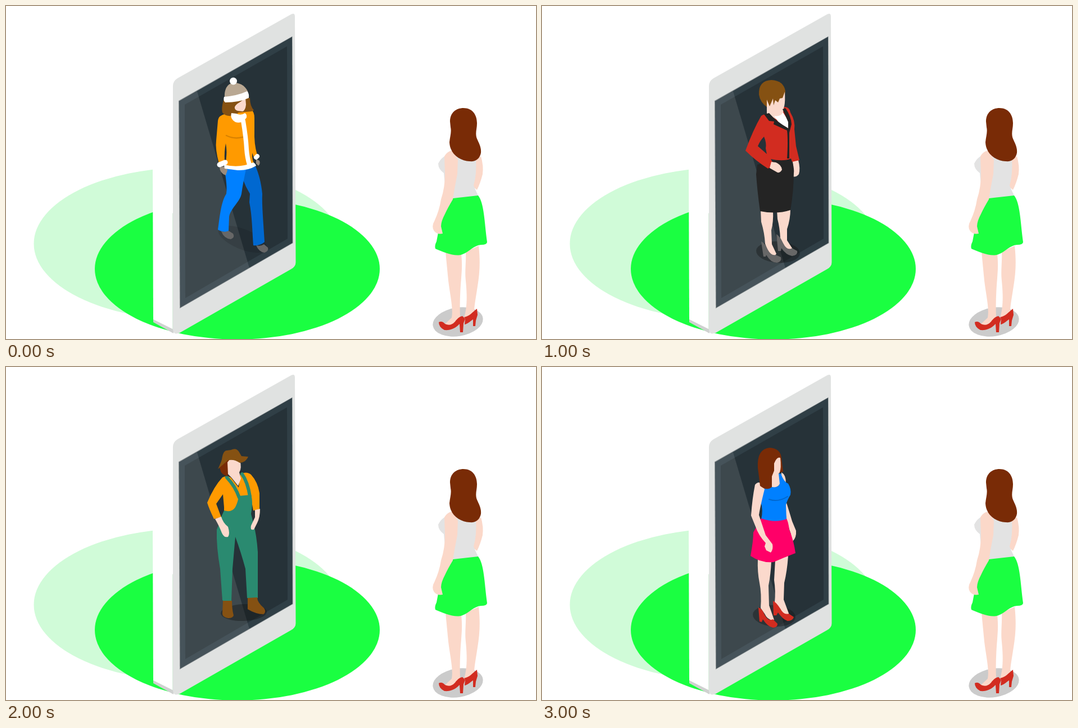
Write an HTML page that moves like this. It is 943 by 594 pixels and loops after 3500 ms.

```html
<!DOCTYPE html>
<html lang="en">
<head>
<meta charset="utf-8">
<title>Virtual fitting room</title>
<style>
html, body { margin: 0; width: 100%; height: 100%; overflow: hidden; background: #fff; }
svg { display: block; width: 943px; height: 594px; }
</style>
</head>
<body>
<svg id="stage" viewBox="0 0 943 594"></svg>
<script>
const C = {
  green: '#1aff41', pale: '#d0fbd8', skin: '#fbd8c9', face: '#fbd9cc',
  auburn: '#792b06', brown: '#855112', red: '#d22c20', orange: '#ff9a00',
  blue: '#0080ff', navy: '#0068d0', pink: '#ff0068', tan: '#b9a893',
  grey: '#676767', black: '#242424', jeans: '#3468d2', jeansDark: '#2a55a8',
  teal: '#2a8a70', white: '#fff', fur: '#e8e8e5', screen: '#263238'
};
const col = c => C[c] || c;
const fill = (c, d) => `<path fill="${col(c)}" d="${d}"/>`;
const line = (c, w, d) =>
  `<path fill="none" stroke="${col(c)}" stroke-width="${w}" stroke-linecap="round" d="${d}"/>`;
const oval = (c, x, y, rx, ry, turn = 0) =>
  `<ellipse fill="${col(c)}" cx="${x}" cy="${y}" rx="${rx}" ry="${ry}" transform="rotate(${turn} ${x} ${y})"/>`;
const shadow = (x, y, rx, ry, turn = 0, alpha = .4) =>
  oval(`rgba(20,20,20,${alpha})`, x, y, rx, ry, turn);

const scene = [
  oval('pale', 322.5, 424, 273, 135.5),
  oval('green', 411.5, 469, 253.5, 125.7),
  // tablet
  fill('white', 'M260.500 155L300 132V583L262 563Z'),
  line('#d9efdc', 1, 'M296.5 370V578'),
  fill('#cfd1d0', 'M262 559L298 577V584L262 564Z'),
  fill('#e0e2e1', 'M297 143Q297 134 305 129L507 15Q514 11 514 19L515.500 457Q515.500 465 507 469.500L309 583Q297 588 297 576Z'),
  fill('#8d9395', 'M307 169L509.500 54L510.500 423L309 539.500Z'),
  fill('#303f46', 'M308 169.700L509 55L509.700 422.500L310 538Z'),
  fill('screen', 'M318 176L500 72L501 415L319 521Z'),
  fill('rgba(255,255,255,.105)', 'M308 169.700L340 152L433 467L310 538Z')
];

const viewer = [
  oval('#cbcbcb', 804, 563.5, 45, 25.5, -9),
  fill('skin', 'M845 268Q850 285 848 300Q844 316 838 328L828 320L830 275Z'),
  fill('skin', 'M818 438L841 428C844 455 843 475 839 500C836 520 833 535 833 546L824 556L815 556C820 540 821 520 818 490C816 475 819 455 818 438Z'),
  fill('skin', 'M782 438L810 442C812 462 811 470 810 485C808 510 807 530 808 554L796 570Q786 574 778 570L793 556C796 540 790 515 787 490Z'),
  fill('#e3e3e3', 'M782 267Q774 271 769 281Q769 291 779 298L781 320L778 344L841 340Q835 328 832 320Q838 300 836 270Z'),
  fill('green', 'M795 343L840 338C851 352 851 385 856 421Q856 426 845 426C832 427 825 438 812 443C800 448 780 440 764 433Q762 428 766 420L773 383Z'),
  fill('skin', 'M780 268Q787 256 797 259L804 275L803 300Q798 325 795 345Q786 360 781 371Q774 384 774 393L777 406Q766 408 761 400Q757 392 762 384Q771 365 774 345Q781 324 781 300Z'),
  fill('auburn', 'M790 206C790 190 801 182 814 182C829 182 838 193 838 209C838 219 835 225 837 234C840 243 846 250 845 262C843 273 835 278 825 277C808 276 790 265 789 243C790 232 793 225 791 216Z'),
  fill('red', 'M815 555C824 554 830 546 838 540L839 551L836 561L835 571L831 571L831 559C826 562 822 567 816 568L817 558Z'),
  fill('red', 'M770 564Q776 561 781 567Q791 572 799 563C804 556 808 554 812 553L817 558L814 566L813 582L808 582L807 567C800 575 790 579 780 578Q770 573 770 564Z')
];

const outfits = [
  [ // winter jacket
    shadow(421, 416, 46, 18, 22, .14),
    fill('navy', 'M420 292L444 286C450 300 454 315 456 335C455 355 458 385 460 421Q452 428 440 427C438 400 438 375 433 350L434 335Q426 322 421 308Z'),
    fill('blue', 'M388 287Q405 295 427 291C424 305 421 320 419 335C416 350 400 360 397 376L396 402Q388 405 377 399C380 380 382 350 392 335C394 320 390 300 388 287Z'),
    fill('grey', 'M383 402Q390 404 396 401L404 406Q408 413 400 416Q388 415 383 402Z'),
    fill('grey', 'M445 427Q453 429 459 425L466 431Q468 437 460 440Q450 439 445 427Z'),
    fill('#9a8b7c', 'M380 287Q380 298 391 302L394 293L391 286ZM445 273L451 276Q453 282 449 285L445 281Z'),
    fill('orange', 'M382 196Q390 191 404 192L436 185Q442 188 442 200L442 222Q441 245 447 266L441 270L438 262Q437 275 443 283Q420 294 390 287Q393 270 391 255L391 276L379 281Q372 255 374 240L377 205Q378 198 382 196Z'),
    fill('screen', 'M391 245Q394 262 391 275L389 276Q388 260 391 245Z'),
    line('#d98200', 2.5, 'M392 231Q406 238 421 234'),
    fill('brown', 'M387 168Q383 182 385 190Q392 199 408 195L414 190L437 188L441 186Q434 178 434 164Z'),
    fill('face', 'M407 180C411 172 419 172 426 163L427 176Q426 186 421 188L412 187Q406 185 407 180Z'),
    line('white', 8, 'M422 205Q427 235 428 255Q429 270 433 283'),
    fill('white', 'M401 191Q398 201 408 207Q420 211 428 199Q429 193 425 191Q418 196 410 192Z'),
    fill('white', 'M388 283Q415 290 440 279Q444 281 445 285Q430 294 412 293L389 290Z'),
    line('white', 9, 'M380 283L390 279'),
    line('white', 8, 'M445 270L447 268'),
    fill('tan', 'M389 163C388 146 396 137 406 137C419 137 428 145 431 155L410 167Z'),
    fill('white', 'M388 162Q412 160 429 152Q433 156 432 164Q415 172 390 172Q386 169 388 162Z'),
    oval('white', 404.5, 134, 6.5, 6.5)
  ],
  [ // pink tee
    shadow(419, 410, 45, 17, 22, .14),
    fill('face', 'M434 236Q438 255 445 266L449 275Q449 281 444 282L440 270Q436 258 433 245ZM436 202L440 202L438 214Z'),
    fill('navy', 'M422 283L440 274C449 295 452 315 453 335C453 360 455 390 457 416Q448 422 437 419C436 390 434 365 430 345Q430 328 420 307Z'),
    fill('blue', 'M390 281Q410 288 428 281C424 300 420 315 416 335C414 350 400 360 396 375L395 395Q386 399 376 392C378 370 382 350 393 335C392 318 393 300 390 281Z'),
    fill('white', 'M383 395Q391 397 395 394L403 400Q406 406 399 409Q386 408 382 398Z'),
    fill('white', 'M444 419Q451 421 457 417L463 423Q465 430 458 432Q448 430 444 419Z'),
    fill('pink', 'M379 196Q388 191 401 194L434 186Q440 192 440 201L438 212Q440 224 434 238Q436 262 441 276Q420 291 388 282Q392 262 390 245L389 213Q381 214 376 211Q374 202 379 196Z'),
    line('#c80054', 3, 'M392 230Q408 238 436 230'),
    fill('face', 'M377 211L389 213Q390 235 388 250Q385 268 386 282L392 288Q393 296 390 298L380 294Q378 288 379 282Q375 260 376 245Z'),
    fill('brown', 'M384 192Q386 180 388 170Q390 155 397 147Q404 142 412 143Q426 144 428 160Q428 180 438 187L424 190L400 196Q388 197 384 192Z'),
    fill('face', 'M401 194L414 186L423 189Q424 205 413 206Q404 204 401 194Z'),
    fill('face', 'M424 155Q427 166 424 179Q421 188 416 188Q410 188 406 182Q408 174 414 172Q419 165 424 155Z')
  ],
  [ // office suit
    shadow(420, 439, 39, 19, 4),
    fill('face', 'M389 363L411 365Q412 385 408 400L409 425L417 442Q410 452 403 440L397 424Q396 405 390 385ZM418 364L442 362Q442 380 436 398L436 418L447 435Q440 444 432 430L424 414Q423 395 419 380Z'),
    fill('grey', 'M390 420Q396 422 402 435Q408 446 416 444L425 448Q427 456 418 458Q407 458 399 444L398 447L394 447Z'),
    fill('grey', 'M417 407Q423 410 429 423Q436 437 445 432L454 437Q456 444 445 446Q434 444 426 432L425 437L420 437Z'),
    fill('face', 'M446 277L456 275Q460 290 457 300Q452 306 446 304Q450 295 447 288Z'),
    fill('black', 'M383 283L410 276L440 271Q448 277 448 295Q448 330 442 364Q418 372 388 366Q383 330 381 300Z'),
    fill('red', 'M390 196Q397 191 405 193L432 180Q440 180 442 190Q451 205 449 220L452 250L458 275L445 278L443 272Q430 278 407 273L411 280Q409 287 402 290Q380 276 362 258Q376 220 390 196Z'),
    fill('screen', 'M395 233Q400 245 398 254L400 264L384 250Q388 240 395 233Z'),
    fill('face', 'M400 178L431 176L429 190L438 215L410 198L400 192Z'),
    fill('white', 'M413 196Q424 198 429 190L439 206L439 219L422 209Z'),
    fill('black', 'M395 193L404 191Q418 207 438 218L438 207L428 184L433 182Q443 196 444 211L440 226L440 272L436 272Q438 240 436 222L412 211L413 206L404 205Z'),
    fill('brown', 'M386 158Q385 133 408 132Q430 133 433 152L431 167L401 181Q388 172 386 158Z'),
    fill('face', 'M400 182L400 167L405 179L411 165L412 177L415 168L420 172L423 165L428 164L432 153Q433 170 431 179Q427 187 420 185Z'),
    fill('face', 'M408 278L416 279Q426 283 427 292Q424 298 419 297L405 289Z')
  ],
  [ // green tee
    shadow(403, 446, 37, 18, 5),
    fill('face', 'M434 246Q440 255 443 270L451 293Q455 300 453 308Q448 318 442 315L441 305L443 296Q437 285 434 275Z'),
    fill('jeansDark', 'M411 298L437 292Q436 330 427 360Q421 395 420 430Q412 434 402 432Q402 400 405 375Q410 335 411 298Z'),
    fill('jeans', 'M381 293Q395 300 413 298L411 330Q408 360 405 380L403 442Q390 447 378 441Q376 420 379 395Q376 370 384 345Q385 320 381 293Z'),
    fill('white', 'M382 443Q392 447 402 442L415 452Q418 460 409 462Q392 459 382 443Z'),
    fill('white', 'M402 432Q411 434 420 430L434 440Q438 448 430 451Q412 448 402 434Z'),
    fill('green', 'M368 222L402 225L414 208L428 195Q436 202 434 215L435 225Q434 260 436 294Q415 303 380 296Q384 270 380 249L369 246Z'),
    fill('face', 'M368 245L384 248Q381 265 378 278Q386 300 389 319L398 326Q402 335 396 331Q391 333 399 338Q394 344 387 341Q377 335 378 322Q366 300 363 278Q364 260 368 245Z'),
    fill('brown', 'M369 222Q374 200 374 170Q374 143 397 142Q420 143 426 165L423 195Q428 202 431 209Q422 213 413 211L404 212L404 228Q385 230 369 222Z'),
    fill('face', 'M414 159Q424 156 424 172Q424 190 419 196L412 198L413 211Q409 216 404 214L397 205Q396 190 404 184Q414 177 414 159Z')
  ],
  [ // dungarees
    shadow(423, 438, 41, 15, -2),
    fill('orange', 'M385 197Q392 193 400 197L414 215L417 190Q430 186 436 192Q448 205 451 225L451 254L440 256L437 240L430 262H388L388 250L386 227L374 244L383 268L370 271Q361 252 358 242Q370 213 385 197Z'),
    fill('teal', 'M388 256Q402 260 408 250Q413 240 414 230L436 228Q440 240 436 262L440 278Q446 300 448 330L448 412Q438 415 429 412L426 360Q418 330 408 303L403 360L401 418Q390 420 385 416L381 360Q374 320 375 290Q382 275 384 265Z'),
    line('teal', 6, 'M393 197Q408 213 415 233M420 191Q430 205 434 231'),
    fill('face', 'M372 271L383 267Q386 278 395 285Q399 298 395 303Q388 305 384 296Q380 285 372 271ZM443 255L452 253Q452 268 447 278L441 290Q434 292 436 283L443 268Z'),
    fill('brown', 'M386 417L402 417Q402 432 405 443Q404 448 395 448Q385 446 385 440ZM430 412L447 411Q447 420 459 430Q464 437 458 441Q445 441 430 432Z'),
    fill('auburn', 'M387 164L401 164L394 195Q382 192 381 182Q376 178 387 164Z'),
    fill('face', 'M394 170L398 165L416 166Q420 180 415 188L418 199L413 212L401 197L395 191Z'),
    fill('brown', 'M384 165Q386 150 392 149L400 148Q410 143 415 152L419 159L431 160Q427 170 416 171Q404 163 394 167Q384 176 377 182Q382 172 384 165Z')
  ],
  [ // winter coat
    shadow(417, 434, 37, 18, 4),
    fill('grey', 'M393 342L412 343L410 373L393 374ZM419 338L439 333L436 368L418 369Z'),
    fill('tan', 'M388 370Q398 374 411 370L407 405L408 425L421 441Q424 450 415 452Q405 450 398 437L397 441L391 440L390 405Z'),
    fill('tan', 'M416 364Q426 368 438 365Q438 385 434 400L435 415L448 430Q452 438 442 440Q432 438 424 425L423 432L418 431Q417 400 414 385Z'),
    fill('#918371', 'M435 232Q446 258 449 279L442 281L434 250Z'),
    fill('tan', 'M386 206Q392 200 400 206L428 190Q436 194 437 208Q445 215 444 225Q440 234 435 240Q438 262 442 283L455 329Q430 342 410 342L376 331Q384 305 386 287Q378 275 377 262Q380 225 386 206Z'),
    fill('screen', 'M396 245Q398 256 394 268Q390 260 396 245Z'),
    line('#94826f', 2, 'M405 236Q420 242 439 233'),
    fill('fur', 'M391 204L398 197L428 190Q431 200 428 209Q422 217 412 217L400 209Z'),
    fill('fur', 'M376 327Q392 336 413 340L414 347Q392 350 374 336ZM436 333L456 327L457 335L437 341Z'),
    fill('fur', 'M397 302Q405 297 411 305Q416 315 412 325Q403 326 401 314ZM444 279L451 279Q457 292 449 306L443 301Z'),
    fill('brown', 'M389 180Q388 150 408 149Q428 150 429 165L430 192L414 193L412 214Q406 222 399 219Q391 210 390 195Z'),
    fill('face', 'M417 170Q420 163 427 164Q429 180 426 190Q422 195 415 193Q418 182 417 170Z')
  ],
  [ // summer skirt
    shadow(413, 444, 38, 19, 4),
    fill('face', 'M384 343L408 346Q407 370 403 390L404 425L413 451Q402 453 396 440L389 430Q391 405 387 385Q383 365 384 343ZM415 344L438 337Q436 365 431 385L430 415L440 442Q430 445 424 432L414 420Q416 400 413 380Z'),
    fill('red', 'M385 429Q391 430 396 442Q402 454 411 450L419 458Q419 465 411 465Q401 463 393 450L391 455L387 454Z'),
    fill('red', 'M411 417Q417 420 424 431Q430 443 439 440L448 446Q446 453 437 453Q428 450 420 438L417 443L412 443Z'),
    fill('face', 'M426 188Q434 192 434 207L425 204ZM433 236Q440 258 445 275L452 292Q453 304 446 311L441 309L443 298Q436 280 433 258Z'),
    fill('blue', 'M391 215L410 213Q422 216 422 208L420 190L425 190Q430 205 438 208Q444 218 442 228Q436 238 434 246L435 273Q415 278 390 272Q394 255 389 240Z'),
    line('navy', 2, 'M404 236Q420 242 437 231'),
    fill('pink', 'M390 270Q415 279 435 271Q438 275 440 290Q448 310 451 332Q430 340 412 348Q390 350 371 337Q376 310 376 295Z'),
    fill('face', 'M379 210Q385 203 390 208L396 218Q388 250 386 264Q393 285 398 300L410 316Q412 325 407 331L399 327L396 320L398 314Q385 300 380 285L372 265Q374 235 379 210Z'),
    fill('auburn', 'M384 180Q382 146 405 144Q424 145 426 162L429 187L413 190L409 214Q400 222 388 212Q386 195 384 180Z'),
    fill('face', 'M413 172Q418 159 424 162Q426 180 423 188L421 190L423 208Q420 216 409 214L409 195L413 185Z')
  ]
];

const group = parts => `<g class="outfit">${parts.join('')}</g>`;
const stage = document.getElementById('stage');
stage.innerHTML = scene.join('') + outfits.map(group).join('') + viewer.join('');

const hold = 500, loop = hold * outfits.length;
stage.querySelectorAll('.outfit').forEach((g, i) => g.animate([
  { opacity: 1, offset: 0, easing: 'step-end' },
  { opacity: 0, offset: hold / loop, easing: 'step-end' },
  { opacity: 0, offset: 1 }
], { duration: loop, delay: i * hold - loop, iterations: Infinity }));
</script>
</body>
</html>
```
